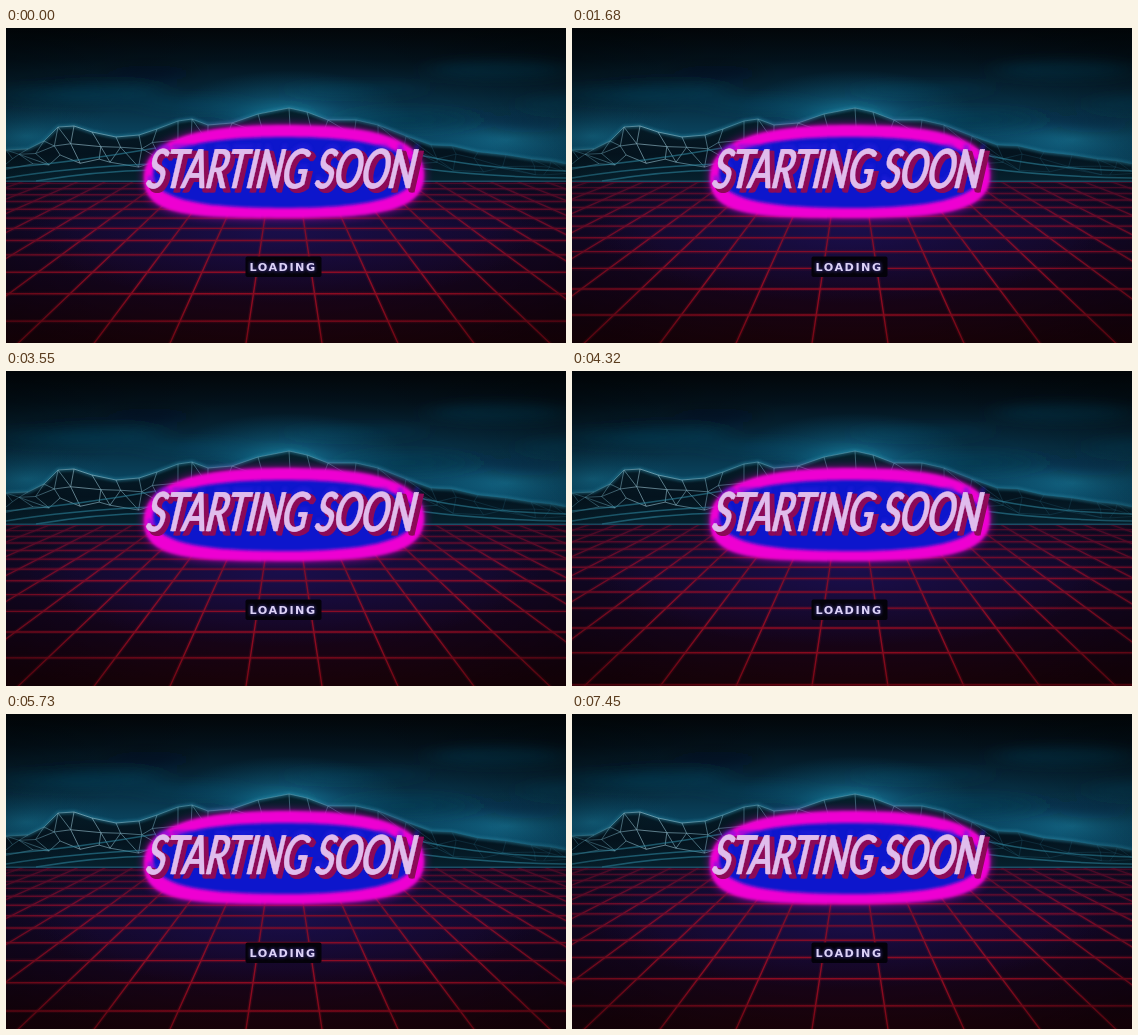
An HTML page for the animation above (7490 ms loop, 560 by 315 pixels).

```html
<!DOCTYPE html>
<html lang="en">
<head>
<meta charset="utf-8">
<title>Starting soon</title>
<style>
  html, body { margin: 0; width: 100%; height: 100%; overflow: hidden; background: #02070b; }
  svg { display: block; width: 100vw; height: 100vh; }
  .title { font: 400 54px Lato, "Open Sans", sans-serif; text-anchor: middle; }
  .loading { font: 700 11.2px "DejaVu Sans", sans-serif; letter-spacing: 1.5px; }
</style>
</head>
<body>
<svg viewBox="0 0 560 315">
  <defs>
    <linearGradient id="sky" x2="0" y2="1">
      <stop offset="0" stop-color="#02070b"/>
      <stop offset=".2" stop-color="#03121c"/>
      <stop offset=".45" stop-color="#062a3d"/>
      <stop offset=".7" stop-color="#0a4560"/>
      <stop offset="1" stop-color="#0b4a68"/>
    </linearGradient>
    <radialGradient id="halo">
      <stop offset="0" stop-color="#2092b4" stop-opacity=".75"/>
      <stop offset=".5" stop-color="#127094" stop-opacity=".35"/>
      <stop offset="1" stop-color="#0c5a7c" stop-opacity="0"/>
    </radialGradient>
    <linearGradient id="rock" x2="0" y2="1">
      <stop offset="0" stop-color="#06202c"/>
      <stop offset=".6" stop-color="#04131e"/>
      <stop offset="1" stop-color="#06222f"/>
    </linearGradient>
    <linearGradient id="wire" gradientUnits="userSpaceOnUse" x2="560">
      <stop offset="0" stop-color="#4a93aa" stop-opacity=".5"/>
      <stop offset=".13" stop-color="#a0c8d6" stop-opacity=".75"/>
      <stop offset=".3" stop-color="#6ca6ba" stop-opacity=".6"/>
      <stop offset=".55" stop-color="#6ca6ba" stop-opacity=".6"/>
      <stop offset=".8" stop-color="#2c7c9a" stop-opacity=".25"/>
    </linearGradient>
    <linearGradient id="floor" x2="0" y2="1">
      <stop offset="0" stop-color="#0a0a20"/>
      <stop offset=".3" stop-color="#120828"/>
      <stop offset=".65" stop-color="#14041a"/>
      <stop offset="1" stop-color="#1c0209"/>
    </linearGradient>
    <radialGradient id="haze">
      <stop offset="0" stop-color="#1c1054" stop-opacity=".8"/>
      <stop offset="1" stop-color="#1c1054" stop-opacity="0"/>
    </radialGradient>
    <linearGradient id="neon" gradientUnits="userSpaceOnUse" x1="0" y1="154" x2="0" y2="315">
      <stop offset="0" stop-color="#5c0c2c" stop-opacity=".7"/>
      <stop offset=".25" stop-color="#780c2c"/>
      <stop offset=".6" stop-color="#8c0c24"/>
      <stop offset="1" stop-color="#880818"/>
    </linearGradient>
    <radialGradient id="vignette" cx=".5" cy=".5" r=".65">
      <stop offset=".6" stop-color="#000" stop-opacity="0"/>
      <stop offset="1" stop-color="#000" stop-opacity=".35"/>
    </radialGradient>
    <filter id="soft" x="-30%" y="-60%" width="160%" height="220%"><feGaussianBlur stdDeviation="14 6"/></filter>
    <filter id="glow" x="-20%" y="-40%" width="140%" height="180%"><feGaussianBlur stdDeviation="5"/></filter>
    <filter id="edge" x="-10%" y="-20%" width="120%" height="140%"><feGaussianBlur stdDeviation="1.5"/></filter>
    <clipPath id="ground"><rect y="154" width="560" height="161"/></clipPath>
    <path id="badge" d="M138 150C138 113 186 97 279 97S418 112 418 147S376 190 278 190S138 187 138 150Z"/>
    <!-- Two offset copies give the thick uprights of a broad pen. -->
    <g id="title" class="title" transform="translate(271.5 160) skewX(-13) scale(.63 1)">
      <text>STARTING SOON</text>
      <text x="2.4">STARTING SOON</text>
    </g>
  </defs>

  <rect width="560" height="156" fill="url(#sky)"/>
  <g id="clouds" filter="url(#soft)"></g>
  <ellipse cx="284" cy="88" rx="120" ry="46" fill="url(#halo)"/>
  <ellipse cx="20" cy="108" rx="90" ry="34" fill="url(#halo)" opacity=".5"/>
  <ellipse cx="500" cy="112" rx="120" ry="34" fill="url(#halo)" opacity=".5"/>
  <path id="hills" fill="url(#rock)"/>
  <path id="ridge" fill="none" stroke="#2a88a4" stroke-width="3" opacity=".6" filter="url(#edge)"/>
  <path id="mesh" fill="none" stroke="url(#wire)" stroke-width=".8"/>
  <path d="M0 140Q70 134 150 120M0 150Q60 140 145 136M30 153Q90 143 150 142M405 125Q470 141 560 143M412 140Q480 149 560 150"
        fill="none" stroke="#2c829c" stroke-width="1.4" opacity=".6"/>
  <path d="M0 153.5H560" stroke="#2a6c8c" stroke-width="2" opacity=".6" filter="url(#flat)"/>

  <g clip-path="url(#ground)">
    <rect y="154" width="560" height="161" fill="url(#floor)"/>
    <ellipse cx="278" cy="200" rx="260" ry="75" fill="url(#haze)"/>
    <g fill="none" stroke="url(#neon)">
      <path id="rails" stroke-width="1.4"/>
      <path id="railGlow" stroke-width="4" opacity=".2"/>
      <path id="rows" stroke-width="1.4"/>
      <path id="rowGlow" stroke-width="4" opacity=".2"/>
    </g>
  </g>
  <rect width="560" height="315" fill="url(#vignette)"/>

  <use href="#badge" fill="#d010c0" opacity=".75" filter="url(#glow)"/>
  <use href="#badge" fill="#ee06d2" filter="url(#edge)"/>
  <path d="M147 146C147 121 196 109 278 109S409 121 409 145S362 180 278 180S147 171 147 146Z"
        fill="#0a16cc" filter="url(#edge)"/>
  <use href="#title" x="1" y="-5" fill="#2c20e0" opacity=".4" filter="url(#edge)"/>
  <use href="#title" x="4" y="3" fill="#8c0a58" stroke="#8c0a58" stroke-width="3"/>
  <use href="#title" fill="#e0bcec" stroke="#e0bcec" stroke-width=".5"/>

  <rect id="plate" x="239.5" y="228.5" width="76" height="20.5" rx="2" fill="#04020a"/>
  <g id="label" class="loading">
    <text x="243.5" y="242.5" fill="none" stroke="#5a48d0" stroke-width="2" opacity=".4" filter="url(#edge)">LOADING</text>
    <text x="243.5" y="242.5" fill="#dcd2f6">LOADING</text>
  </g>
</svg>
<script>
const LOOP = 7490, ROWS_PER_LOOP = 8, BLINK = 2550, FADE = 200;
const VANISH = { x: 278, y: 62 }, RAIL_GAP = 0.3, ROW_DEPTH = 0.00058, START_PHASE = 0.54;
const el = id => document.getElementById(id);
const setPath = (d, ...ids) => ids.forEach(id => el(id).setAttribute('d', d));

let seed = 11;
const random = () => (seed = seed * 16807 % 2147483647) / 2147483647;

function drawClouds() {
  el('clouds').innerHTML = Array.from({ length: 16 }, (_, i) => {
    const x = i * 38 + random() * 30 - 20, y = 40 + random() * 65;
    const fill = i % 2 ? '#0f5878' : '#031019';
    return `<ellipse cx="${x}" cy="${y}" rx="${35 + random() * 35}" ry="${4 + random() * 6}" fill="${fill}" opacity=".3"/>`;
  }).join('');
}

function drawMountains() {
  const base = 153;
  const ridge = [[0, 122], [22, 121], [38, 113], [52, 99], [68, 98], [86, 104], [110, 109], [133, 107],
    [151, 101], [172, 93], [186, 91], [202, 97], [226, 95], [252, 86], [283, 80], [301, 84], [322, 92],
    [350, 92], [372, 97], [400, 108], [425, 117], [446, 118], [472, 124], [500, 127], [525, 131], [545, 133], [560, 136]];
  const outline = 'M' + ridge.map(p => p.join()).join('L');
  setPath(outline, 'ridge');
  setPath(`${outline}V156H0Z`, 'hills');

  const layers = [0, 0.3, 0.6].map((f, row) => ridge.map(([x, y]) => {
    const jitter = row ? 1 : 0;
    return [x + jitter * (random() - 0.5) * 18, y + (base - y) * f + jitter * (random() - 0.5) * 9];
  }));
  let d = outline;
  const join = (a, b) => { d += `M${a}L${b}`; };
  for (let r = 1; r < layers.length; r++) {
    layers[r].forEach((p, i) => {
      join(layers[r - 1][i], p);
      if (!i) return;
      join(layers[r][i - 1], p);
      if (random() < 0.5) join(layers[r - 1][i - 1], p);
    });
  }
  setPath(d, 'mesh');
}

function drawRails() {
  let d = '';
  for (let k = -10.5; k <= 10.5; k++) {
    const at = y => VANISH.x + k * RAIL_GAP * (y - VANISH.y);
    d += `M${at(150)} 150L${at(320)} 320`;
  }
  setPath(d, 'rails', 'railGlow');
}

function update(t) {
  const phase = (START_PHASE + t * ROWS_PER_LOOP / LOOP) % 1;
  let d = '';
  for (let n = 7; n <= 20; n++) {
    const y = VANISH.y + 1 / (ROW_DEPTH * (n - phase));
    d += `M0 ${y.toFixed(2)}H560`;
  }
  setPath(d, 'rows', 'rowGlow');

  const cycle = Math.round(t / BLINK);
  const distance = cycle ? Math.abs(t - cycle * BLINK) : FADE;
  const shown = Math.min(1, distance / FADE);
  el('plate').setAttribute('opacity', shown ** 2);
  el('label').setAttribute('opacity', 0.2 + 0.8 * shown);
}

drawClouds();
drawMountains();
drawRails();
const start = performance.now();
function tick() {
  update((performance.now() - start) % LOOP);
  requestAnimationFrame(tick);
}
tick();
</script>
</body>
</html>
```
